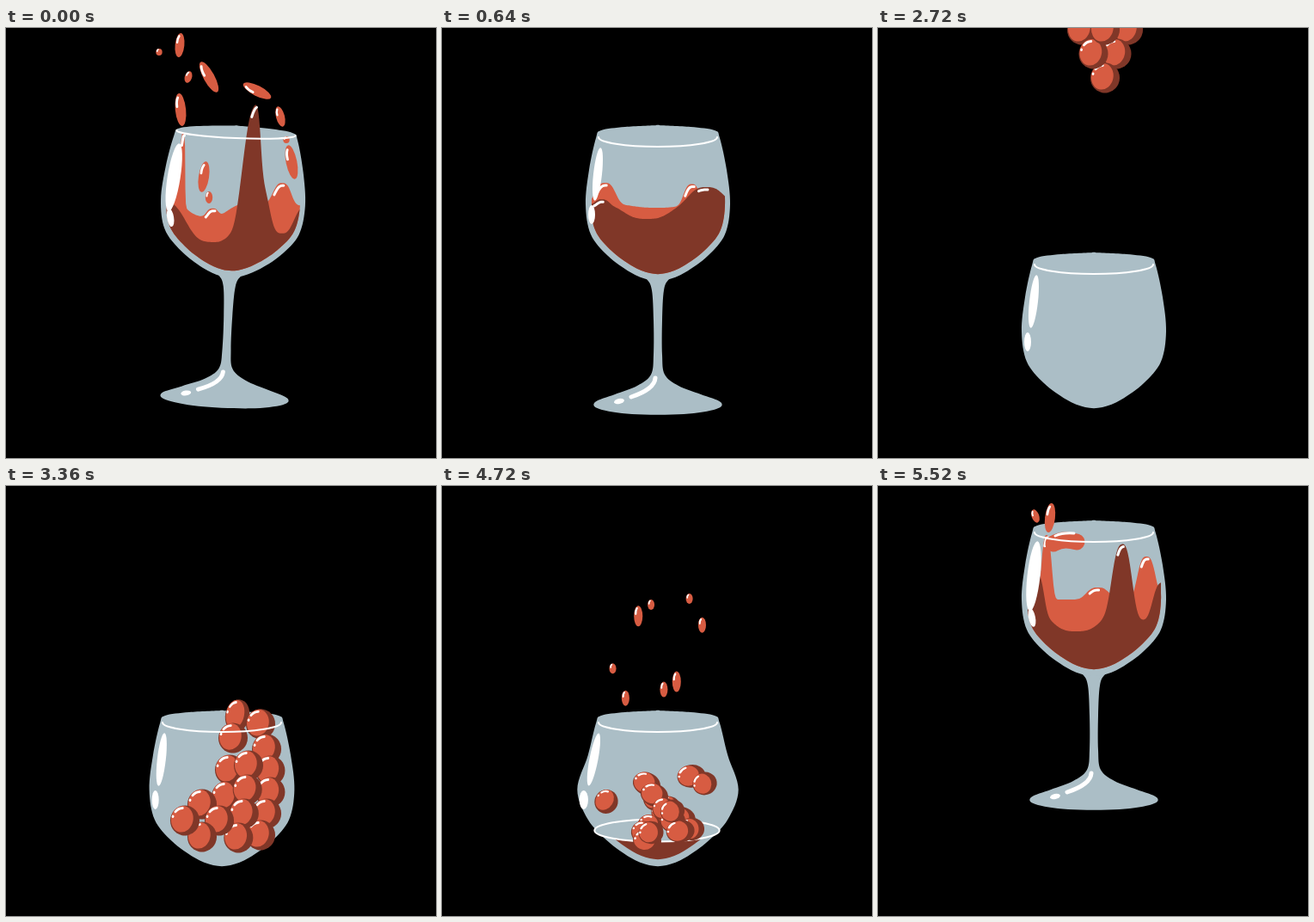
An HTML page with a canvas for the animation above (5600 ms loop, 500x500 px).

```html
<!DOCTYPE html>
<html lang="en">
<head>
<meta charset="utf-8">
<title>From grapes to wine</title>
<style>
html, body { margin: 0; height: 100%; overflow: hidden; background: #000; }
canvas { display: block; }
</style>
</head>
<body>
<canvas id="stage" width="500" height="500"></canvas>
<script>
const c = document.getElementById('stage').getContext('2d');
const GLASS = '#abbec6', RED = '#d75c42', DARK = '#803728', WHITE = '#fff';
const LOOP = 5600, STEP = 80, MID = 251, CUP_Y = 148;
const { PI, sin, cos, abs, exp, min, max } = Math;
const clamp = v => max(0, min(1, v));
const mix = (a, b, k) => a + (b - a) * k;

// Half profiles: distance from the axis, y
const BOWL = [[0,113], [38,115], [66,119], [72,128], [80,165], [84,205], [78,240], [58,265], [32,284], [10,293]];
const STEM = [[10,278], [25,284], [13,292], [7,305], [5,340], [5,380], [8,403], [24,416], [50,426], [73,435],
  [68,443], [30,449]];

// Wine surfaces as sums of bumps: height, centre, width
const CALM = { back: [[-8, .5, .4]], front: [[9, .5, .4]] };
const WAVE = {
  back: [[-25, .1, .09], [-24, .74, .07], [4, .48, .2]],
  front: [[17, .41, .2], [-20, .85, .15], [-6, .08, .06]]
};
const FALL = {
  back: [[-85, .1, .03], [18, .3, .18], [-10, .34, .05], [-26, .85, .08]],
  front: [[48, .34, .22], [-100, .61, .075], [-25, .66, .1], [34, .86, .1]]
};
const LEAP = {
  back: [[-75, .14, .045], [-14, .52, .1], [-50, .88, .08]],
  front: [[-40, .07, .06], [37, .36, .25], [-68, .7, .09], [24, .84, .09], [-20, 1, .08]]
};

// Drops: x, y, half length, lean
const FALL_DROPS = [[178,28,4,0], [202,20,14,.1], [212,57,7,.3], [236,57,20,-.5], [292,73,18,-1.1], [203,95,19,-.1],
  [319,103,12,-.25], [326,130,4,0], [332,156,20,-.2], [230,173,18,.15], [236,197,7,0]];
const LEAP_DROPS = [[183,35,8,-.35], [200,37,17,.12]];
const JUICE_DROPS = [[221,328,22,.6], [211,319,4,0], [286,335,12,-.2]];

// A curved column, a middle stack, a front stack and a ring
const repeat = (n, f) => Array.from({ length: n }, (_, i) => f(i));
const GRAPES = [
  ...repeat(4, i => [268 - 4 * i, 268 + 31 * i]),
  ...repeat(6, i => [296 + 12 * sin(PI * i / 5), 281 + 25 * i]),
  ...repeat(4, i => [282 - i * i * 1.3, 325 + 28 * i]),
  ...repeat(4, i => [228 - 20 * cos((i + 1) * PI / 2), 389 - 19 * sin((i + 1) * PI / 2)])
];
const BY_HEIGHT = [...GRAPES].sort((a, b) => b[1] - a[1]);

function curve(pts) {
  const n = pts.length, at = i => pts[(i + n) % n];
  c.beginPath();
  c.moveTo(...pts[0]);
  for (let i = 0; i < n; i++) {
    const [p, q, r, s] = [at(i - 1), at(i), at(i + 1), at(i + 2)];
    c.bezierCurveTo(q[0] + (r[0] - p[0]) / 6, q[1] + (r[1] - p[1]) / 6,
      r[0] - (s[0] - q[0]) / 6, r[1] - (s[1] - q[1]) / 6, ...r);
  }
}
function fill(color) {
  c.fillStyle = color;
  c.fill();
}
function stroke(width, color = WHITE) {
  c.lineWidth = width;
  c.strokeStyle = color;
  c.stroke();
}
function oval(x, y, rx, ry, color, angle = 0) {
  c.beginPath();
  c.ellipse(x, y, rx, ry, angle, 0, 2 * PI);
  fill(color);
}
function bend(width, color, x1, y1, cx, cy, x2, y2) {
  c.beginPath();
  c.moveTo(x1, y1);
  c.quadraticCurveTo(cx, cy, x2, y2);
  stroke(width, color);
}
function placed(draw, x, y, angle = 0, sx = 1, sy = 1) {
  c.save();
  c.translate(x, y);
  c.rotate(angle);
  c.scale(sx, sy);
  draw();
  c.restore();
}

// Both sides of a profile; the belly can bulge
const bulge = y => 8.5 * exp(-(((y - 208) / 30) ** 2));
function mirror(half, wide = 0) {
  const right = half.map(([d, y]) => [d + (d && wide * bulge(y)), y]);
  const side = sign => right.map(([d, y]) => [MID + sign * d, y]);
  return [...side(1), ...side(-1).reverse()];
}

function clipInside(wide = 0) {
  curve(mirror(BOWL, wide).map(([x, y]) => [MID + (x - MID) * .93, 180 + (y - 180) * .93]));
  c.rect(MID - 78, -100, 156, 300);
  c.clip();
}

function glassFront(wide, splash, lift = 0) {
  c.beginPath();
  c.ellipse(MID, 127 - 5 * lift, 69, 11 - 5 * lift, 0, 0, PI);
  stroke(2.2);
  oval(181 - 4 * wide, 170 + 8 * splash, 5 + 2.5 * splash, 31 + 10 * splash, WHITE, .11 + .07 * wide);
  oval(174 + 5 * splash - 8 * wide, 217 + 9 * splash, 4 + wide, 11, WHITE, -.2 * splash);
}

function drop([x, y, len, lean], dx = 0, dy = 0, size = 1) {
  const w = (3 + len * .17) * size, h = len * size;
  placed(() => {
    oval(0, 0, w, h, RED);
    bend(w * .45, WHITE, -w * .3, -h * .75, -w * .65, -h * .55, -w * .6, -h * .2);
  }, x + dx, y + dy, lean);
}

// parts: pairs of bump list and weight
function surface(parts, flip) {
  return repeat(121, i => {
    const u = flip ? 1 - i / 120 : i / 120;
    let y = 205;
    for (const [bumps, weight] of parts)
      for (const [h, at, w] of bumps) y += weight * h * exp(-(abs((u - at) / w) ** 3));
    return [174 + 157 * i / 120, y];
  });
}

function liquid(pts, color) {
  c.beginPath();
  pts.forEach(p => c.lineTo(...p));
  c.lineTo(331, 310);
  c.lineTo(174, 310);
  fill(color);
  // A white dash on the left shoulder of each crest
  pts.forEach(([x, y], i) => {
    if (i < 9 || i > 119 || pts[i - 1][1] < y || pts[i + 1][1] <= y) return;
    c.beginPath();
    for (let j = i; j > i - 9 && pts[j][1] - y < 12; j--) c.lineTo(pts[j][0] + 1.5, pts[j][1] + 3);
    stroke(3);
  });
}

function wine(t, s, k) {
  const splash = t < 640 ? FALL : LEAP, rest = 1 - k;
  const layer = name => surface(
    [[CALM[name], rest * (1 - abs(s))], [WAVE[name], rest * abs(s)], [splash[name], k]], s < 0);
  c.save();
  clipInside();
  liquid(layer('back'), RED);
  if (t > 5200) {
    bend(19 * k, RED, 204, 140, 215, 133, 231, 138);
    bend(3 * k, WHITE, 206, 131, 215, 127, 228, 128);
  }
  liquid(layer('front'), DARK);
  c.restore();
}

function wineGlass(t) {
  const calming = max(0, 1 - t / 640), rise = max(0, (t - 5200) / 320);
  const spring = cos(2 * PI * t / 320) * calming ** 2;
  const sway = 2.5 * cos(2 * PI * t / 400) * calming;
  const dy = -8 * spring - 73 * sin(PI / 2 * rise) ** 2;
  const tall = 1 - .024 * spring + (rise && .14 * (1 - rise));
  const slosh = t < 1760 ? cos(2 * PI * (t - 640) / 640) * (1 - max(0, t - 640) / 1120) : 0;
  const splash = max(rise, clamp(1 - t / 320) ** 1.3);
  const pose = draw => placed(() => {
    c.translate(-MID, -451);
    draw();
  }, MID + sway, 451 + dy, sway * PI / 180, 1, tall);

  pose(() => [STEM, BOWL].forEach(half => {
    curve(mirror(half));
    fill(GLASS);
  }));
  if (t < 480) FALL_DROPS.forEach(d => drop(d, (252 - d[0]) * t / 900, t * t * .0011, 1 - (t / 480) ** 2));
  if (rise > .7) LEAP_DROPS.forEach(d => drop(d, 0, 60 * (1 - rise), 2 * rise - 1));
  pose(() => {
    wine(t, slosh, splash);
    glassFront(0, splash, clamp(1 - t / 160));
    bend(5, WHITE, 220, 429, 247, 420, 248, 407);
    oval(206, 434, 6, 3, WHITE, -.2);
  });
}

function grape(x, y, rx, ry, angle) {
  placed(() => {
    oval(0, 0, 1, 1, DARK);
    oval(-.2, -.06, .75, .88, RED);
    for (const [a, b] of [[3.7, 4.5], [3.2, 3.25]]) {
      c.beginPath();
      c.ellipse(-.18, -.04, .68, .76, 0, a, b);
      stroke(.16);
    }
  }, x, y, angle, rx, ry);
}

// The last grape hops off the stack and comes to rest on the left
function hop(t) {
  const p = clamp((t - 3360) / 560), q = clamp((t - 3920) / 480);
  return [269 - 65 * p - 10 * min(1, q * 2), 267 - 135 * p + 216 * p * p - 12 * sin(PI * q)];
}

function grapeAt(i, t) {
  if (i === 0 && t >= 3360) return hop(t);
  const [x, y] = GRAPES[i], rank = BY_HEIGHT.indexOf(GRAPES[i]);
  // The bunch narrows to one grape at its tip
  const row = rank < 1 ? 0 : rank < 3 ? 1 : 1 + Math.floor(rank / 3);
  const n = min(row + 1, 3), col = rank < 3 ? max(0, rank - 1) : rank % 3;
  const x0 = 264 + (col - (n - 1) / 2) * 27, y0 = 58 - 28 * row;
  const e = t - 2720, fall = (.75 * e + .001 * e * e) * (1 - .07 * row);
  const p = clamp(fall / (y - y0)), past = max(0, y0 + fall - y);
  return [mix(x0, x, p * p), min(y, y0 + fall) - 7 * sin(min(PI, past / 50))];
}

// Crushed grapes lie in a sagging row with three more beneath
function pulp(i) {
  const j = i % 9, low = j > 5;
  const x = low ? 220 + 29 * (j - 6) : 188 + 24 * j;
  const y = low ? 417 : 386 + 13 * sin(PI * j / 5);
  return [x, y, 13 + 3 * sin(j * 2), 9, (250 - x) / 70];
}

function juice(level, wide) {
  placed(() => {
    clipInside(wide);
    c.fillStyle = DARK;
    c.fillRect(140, level - CUP_Y, 220, 200);
  }, 0, CUP_Y);
  const rx = 83 * Math.sqrt(1.01 - ((level - 361) / 80) ** 2);
  oval(250, level, rx, rx * .18, GLASS);
  stroke(2);
}

function burst(t) {
  const p = (t - 4560) / 520;
  if (p < 1) {
    for (let i = 0; i < 8; i++) {
      const high = 110 + 155 * sin(i * 2.3 + .6) ** 2;
      drop([205 + 13 * i + (i - 3.5) * p * 6, 348 - high * 4 * p * (1 - p), 6 + i % 3 * 3, 0]);
    }
  }
  if (t >= 5040) JUICE_DROPS.forEach(d => drop(d, 0, (t - 5120) * .1));
}

function cup(t) {
  const crush = clamp((t - 4560) / 320), e = t - 3000;
  const jolt = e > 0 ? .5 * exp(-e / 150) * sin(e / 25) : 0;
  const wide = jolt + clamp((t - 4560) / 120) * (1 + .15 * cos((t - 4720) / 76));
  placed(() => {
    curve(mirror(BOWL, wide));
    fill(GLASS);
  }, 0, CUP_Y);
  if (crush) {
    burst(t);
    juice(mix(440, 361, crush), wide);
  }
  if (t >= 2720) {
    GRAPES.forEach((_, i) => {
      const whole = [...grapeAt(i, t), i ? 17 : 14, i ? 17.5 : 19, .2], flat = pulp(i);
      grape(...whole.map((v, j) => mix(v, flat[j], crush)));
    });
  }
  placed(() => glassFront(wide, 0), 0, CUP_Y);
}

function draw(now) {
  const t = Math.floor(now % LOOP / STEP) * STEP;
  c.fillStyle = '#000';
  c.fillRect(0, 0, 500, 500);
  c.lineCap = c.lineJoin = 'round';
  if (t < 2240 || t >= 5280) wineGlass(t);
  else cup(t);
}

let start;
function tick(now) {
  start ??= now;
  draw(now - start);
  requestAnimationFrame(tick);
}
draw(0);
requestAnimationFrame(tick);
</script>
</body>
</html>
```
